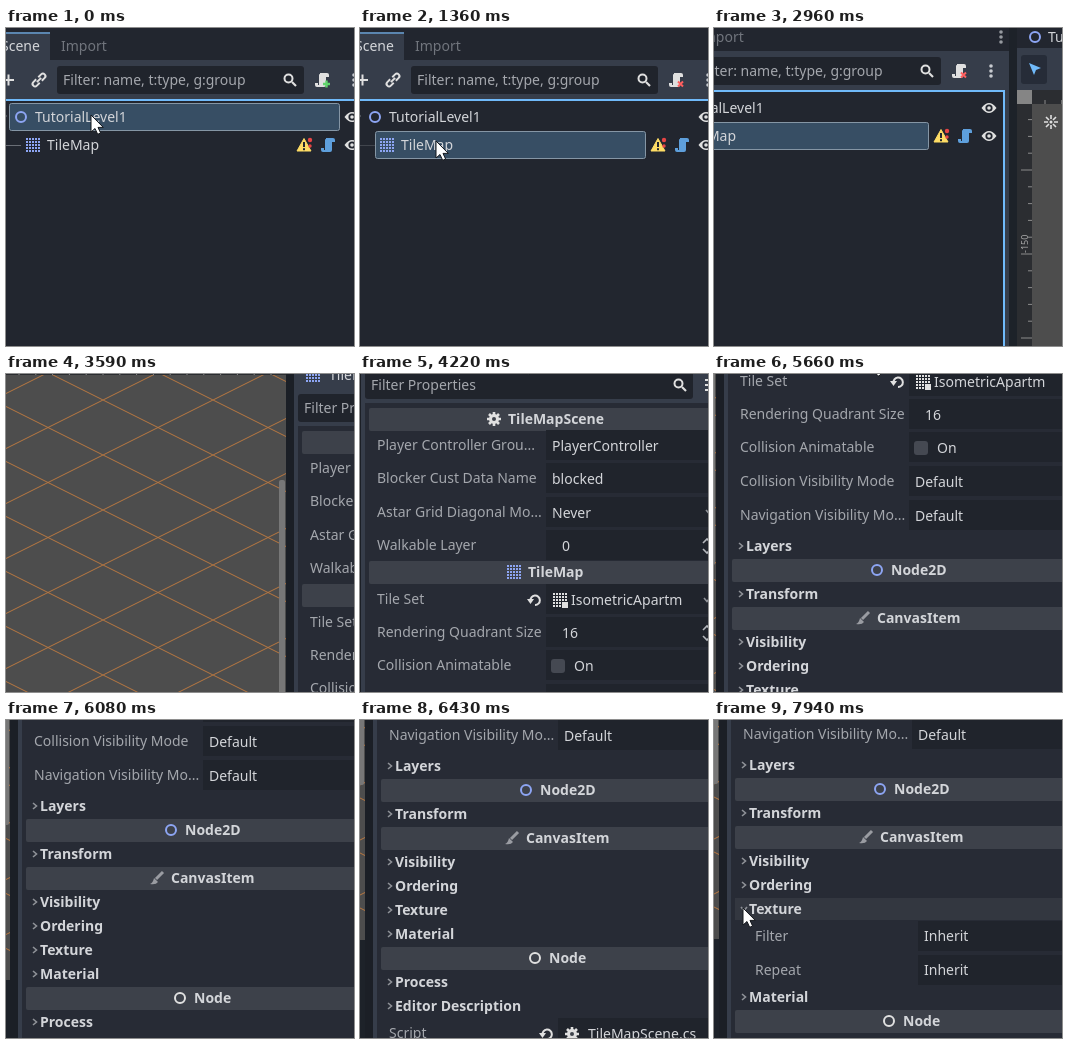
An HTML page that plays this animation: 348 px wide and 318 px high, repeating every 8 s.

```html
<!DOCTYPE html>
<html lang="en">
<head>
<meta charset="utf-8">
<title>Editor walkthrough</title>
<style>
html, body { margin: 0; width: 100%; height: 100%; overflow: hidden; background: #1d2229; }
svg { display: block; width: 100vw; height: 100vh; }
text { font: 14px "Noto Sans", sans-serif; fill: #d3d5d9; white-space: pre; }
.bold { font-weight: 700; }
.label { fill: #a4a7ad; }
.dim { fill: #71757d; }
</style>
</head>
<body>
<svg id="stage" viewBox="0 0 348 318" preserveAspectRatio="none"></svg>
<script>
const LOOP = 8000;
const INSPECTOR = { x: 1180, y: 107 };
const C = { base: '#363d4a', tree: '#22262f', panel: '#272b35', field: '#20242c',
            gap: '#1b1f26', bar: '#3d414a', light: '#e0e0e0', node2d: '#8da5f3', accent: '#70bafa' };

const rect = (x, y, w, h, fill, extra = '') =>
  `<rect x="${x}" y="${y}" width="${w}" height="${h}" fill="${fill}" ${extra}/>`;
// y is the middle of the capital letters
const text = (x, y, s, cls = '') => `<text x="${x}" y="${y + 5}" class="${cls}">${s}</text>`;
const line = (d, color, w = 1, extra = '') =>
  `<path d="${d}" fill="none" stroke="${color}" stroke-width="${w}" ${extra}/>`;
const shape = (d, fill, extra = '') => `<path d="${d}" fill="${fill}" ${extra}/>`;
const dot = (x, y, r, fill) => `<circle cx="${x}" cy="${y}" r="${r}" fill="${fill}"/>`;
const ring = (x, y, color) =>
  `<circle cx="${x}" cy="${y}" r="5" fill="none" stroke="${color}" stroke-width="2"/>`;
const at = (x, y, s, attrs = '') => `<g transform="translate(${x} ${y})" ${attrs}>${s}</g>`;

// Icons are centred on their origin
const search = line('M2 2L6 6', C.light, 2.2) +
  `<circle cx="-1.5" cy="-1.5" r="4" fill="none" stroke="${C.light}" stroke-width="2"/>`;
const eye = shape('M-7.5 0Q0-10 7.5 0Q0 10-7.5 0', C.light) + dot(0, 0, 3.6, '#22262f') + dot(0, 0, 1.8, C.light);
const scroll = color =>
  shape('M-2-7v1a1 1 0 0 0-1 1V5h-1V3h-3v2a2 2 0 0 0 2 2h7a2 2 0 0 0 2-2V-3h3v-2a2 2 0 0 0-2-2z', color);
const warning = shape('M0-6.5L7 6H-7Z', '#ffdd65', 'stroke="#ffdd65" stroke-linejoin="round"') +
  rect(-1, -3, 2, 5, '#22262f') + rect(-1, 3.2, 2, 2, '#22262f') +
  dot(6, -5, 2.2, '#e64545') + dot(6, 1, 1.7, '#e64545');
const dots = [-5, 0, 5].map(y => dot(0, y, 1.8, '#c8cbd0')).join('');
const reload = line('M-4.5 1A4.7 4.7 0 1 1 0 5', C.light, 2) + shape('M-8-1H-1L-4.5 4Z', C.light);
const gear = line('M0-7V7M-7 0H7M-5-5L5 5M-5 5L5-5', C.light, 2.6) + dot(0, 0, 5, C.light) + dot(0, 0, 2, C.bar);
const brush = line('M-1 1L6-6', '#9a9ca2', 3) + shape('M-3 0L1 4Q-1 7-7 6Q-4 5-3 0Z', '#9a9ca2');
const link = at(0, 0, line('M-1.5-2.5H-5.5a2.5 2.5 0 0 0 0 5H-1.5M1.5-2.5H5.5a2.5 2.5 0 0 1 0 5H1.5M-3 0H3', C.light, 2))
  .replace('translate(0 0)', 'rotate(-45)');
const chevron = line('M-2-3L1.5 0L-2 3', '#8f9298', 1.6);
const chevronDown = line('M-3-2L0 1.5L3-2', '#8f9298', 1.6);
const spinner = line('M-4-3L0-7L4-3M-4 3L0 7L4 3', '#b5b8bd', 1.6);
const arrow = 'M0 0V17L4 13.5L6.7 19.3L9.6 18L7 12.4H12.3Z';

function tiles(color, missing = () => false) {
  let s = '';
  for (let i = 0; i < 25; i++) {
    const x = i % 5, y = i / 5 | 0;
    if (!missing(x, y)) s += rect(x * 3 - 7, y * 3 - 7, 2, 2, color);
  }
  return s;
}
const tileMap = tiles(C.node2d);
const tileSet = tiles(C.light, (x, y) => x > 2 && y > 2) + rect(2, 2, 6, 6, C.light);

function sceneDock() {
  const selection = (id, x, y, w) =>
    rect(x, y, w, 27, '#374e64', `id="${id}" stroke="#8596a5" rx="2"`);
  return rect(-80, -60, 446, 700, C.base) +
    rect(-80, -60, 446, 92, C.tree) + rect(-80, 4, 124, 28, C.base) + rect(-80, 4, 124, 2, '#5b86b0') +
    text(-5, 18, 'Scene') + text(55, 18, 'Import', 'dim') + at(358, 18, dots, 'opacity=".7"') +
    line('M-3 52H8M2.5 46.5V57.5', C.light, 2) + at(33, 52, link) +
    rect(51, 38, 247, 28, C.field, 'rx="3"') + text(57, 52, 'Filter: name, t:type, g:group', 'label') +
    at(284, 52, search) + at(316, 52, scroll(C.light)) +
    line('M317 56H324M320.5 52.5V59.5', '#5fd46b', 2.4, 'id="attach"') +
    line('M318 53.5L323 58.5M323 53.5L318 58.5', '#ff5f5f', 2, 'id="detach"') + at(348, 52, dots) +
    rect(-20, 72, 381, 560, C.tree, `stroke="${C.accent}" stroke-width="2"`) +
    selection('rootRow', 3.5, 75.5, 330) + selection('mapRow', 15.5, 103.5, 270) +
    line('M-4 117.5H15', '#6a6e76', 1, 'id="branch"') + dot(-1, 88, 1.5, '#8f9298') +
    ring(15, 89, C.node2d) + text(29, 89, 'TutorialLevel1') + at(346, 89, eye) +
    at(27, 117, tileMap) + text(41, 117, 'TileMap') +
    at(298, 117, warning) + at(322, 117, scroll('#5e9fdc')) + at(346, 117, eye);
}

function viewport() {
  const left = 374, width = INSPECTOR.x - 7 - left;
  let ticks = '';
  for (let i = -4; i < 45; i++) {
    const y = 151 + i * 16.8;
    if (y > 86) ticks += `M${left + (i % 5 ? 11 : 4)} ${y}h${i % 5 ? 4 : 11}`;
  }
  for (let x = 402, i = 1; x < left + width; x += 16.8, i++) ticks += `M${x} 85v${i % 5 ? -4 : -11}`;
  return rect(left, -60, width, 89, C.tree) + ring(392, 18, C.node2d) + text(405, 18, 'TutorialLevel1') +
    rect(left, 29, width, 42, C.base) + rect(378, 36, 26, 29, '#262c38', 'rx="3"') +
    shape('M386 44L398 49L393 51L391 56Z', C.accent) + line('M439.5 38V64', '#4d5562') +
    rect(left, 71, width, 600, '#4d4d4d') +
    rect(480, 85, INSPECTOR.x - 487, 580, 'url(#iso)') +
    rect(left, 71, width, 14, '#2b2d31') + rect(left, 71, 15, 600, '#2b2d31') + rect(left, 71, 15, 14, '#858585') +
    line(ticks, '#8b8b8b') +
    `<text transform="translate(385 234) rotate(-90)" style="font-size:9px;fill:#aaa">-150</text>` +
    at(408, 103, line('M-7 0H-3M3 0H7M0-7V-3M0 3V7M-5-5L-2-2M5-5L2-2M-5 5L-2 2M5 5L2 2', C.light, 1.6) + dot(0, 0, 1.5, C.light)) +
    rect(INSPECTOR.x - 14, 190, 6, 326, '#777', 'rx="2"');
}

function inspector() {
  const header = (y, iconX, icon, textX, title) =>
    rect(9, y - 11, 400, 23, C.bar, 'rx="2"') + at(iconX, y, icon) + text(textX, y, title, 'bold');
  const field = (y, x = 186) => rect(x, y - 15, 220, 30, C.field);
  const property = (y, label, value, x = 192) =>
    text(17, y, label, 'label') + field(y) + text(x, y + 1, value);
  const number = (y, label, value) => property(y, label, value, 202) + at(347, y + 1, spinner);
  const choice = (y, label, value) => property(y, label, value) + at(349, y, chevronDown);
  const section = (y, title) => at(18, y, chevron) + text(23, y, title, 'bold');
  const nested = (y, label) => text(29, y, label, 'label') + field(y, 192) + text(198, y, 'Inherit');

  return rect(-7, -170, 8, 1000, C.gap) + rect(1, -170, 400, 1000, C.base) +
    rect(1, -170, 400, 95, C.tree) + rect(1, -103, 82, 28, C.base) +
    text(12, -89, 'Inspector') + text(95, -89, 'Node', 'dim') + text(148, -89, 'History', 'dim') +
    at(20, -22, tileMap) + text(36, -22, 'TileMap') +
    rect(5, -3, 328, 28, C.field, 'rx="3"') + text(11, 11, 'Filter Properties', 'label') + at(320, 11, search) +
    line('M345 6H352M345 11H352M345 16H352', C.light, 2) +
    rect(5, 29, 400, 800, C.panel) +
    header(45, 134, gear, 148, 'TileMapScene') +
    property(71, 'Player Controller Grou...', 'PlayerController') +
    property(104, 'Blocker Cust Data Name', 'blocked') +
    choice(138, 'Astar Grid Diagonal Mo...', 'Never') +
    number(171, 'Walkable Layer', '0') +
    header(198, 154, tileMap, 168, 'TileMap') +
    property(225, 'Tile Set', 'IsometricApartm', 211) + at(175, 226, reload) + at(200, 226, tileSet) + at(347, 226, chevronDown) +
    number(258, 'Rendering Quadrant Size', '16') +
    property(291, 'Collision Animatable', 'On', 214) + rect(191, 285, 14, 14, '#454952', 'rx="3"') +
    choice(325, 'Collision Visibility Mode', 'Default') +
    choice(359, 'Navigation Visibility Mo...', 'Default') +
    section(390, 'Layers') +
    header(414, 154, ring(0, 0, C.node2d), 168, 'Node2D') +
    section(438, 'Transform') +
    header(462, 140, brush, 154, 'CanvasItem') +
    section(486, 'Visibility') + section(510, 'Ordering') +
    rect(9, 523, 400, 22, '#333740', 'id="pressed"') +
    `<g id="folded">${at(18, 534, chevron)}</g><g id="unfolded">${at(18, 534, chevronDown)}
      ${nested(561, 'Filter')}${nested(595, 'Repeat')}</g>` +
    text(23, 534, 'Texture', 'bold') +
    `<g id="rest">${section(558, 'Material')}${header(582, 163, ring(0, 0, C.light), 177, 'Node')}
      ${section(606, 'Process')}${section(630, 'Editor Description')}
      ${property(657, 'Script', 'TileMapScene.cs', 216)}${at(175, 658, reload)}${at(200, 658, gear)}</g>`;
}

const stage = document.getElementById('stage');
stage.innerHTML = `<defs><pattern id="iso" width="110" height="55" patternUnits="userSpaceOnUse">
    ${line('M0 0L110 55M0 55L110 0', '#b8763f')}</pattern></defs>
  <g id="world">${viewport()}${sceneDock()}${at(INSPECTOR.x, INSPECTOR.y, inspector())}</g>
  <g id="cursor">${shape(arrow, '#fff', 'stroke="#15181d" stroke-width="1"')}</g>`;
const el = Object.fromEntries([...stage.querySelectorAll('[id]')].map(e => [e.id, e]));

// Keys: [time, x, y]
const cameraKeys = [
  [2800, 0, 0], [2960, 70, 9], [3400, 640, 62], [3800, 1100, 101], [4040, 1180, 107],
  [4190, 1180, 107], [5000, 1177, 209], [5660, 1171, 325], [6430, 1168, 451], [6670, 1168, 452]];
const cursorKeys = [
  [20, 85, 87], [150, 92, 86], [330, 92, 86], [480, 84, 82], [680, 45, 112], [800, 23, 128],
  [900, 40, 131], [1050, 76, 113], [2150, 76, 113], [2350, 122, 62], [2600, 178, -24],
  [4040, 178, -24], [4300, 157, -17], [5700, 157, -17], [6400, 157, -24], [6670, 120, 54],
  [6950, 85, 110], [7250, 20, 180], [7450, 29, 188]];

// Monotone cubic interpolation of one column
function track(keys, t, col) {
  const last = keys.length - 1;
  if (t <= keys[0][0]) return keys[0][col];
  if (t >= keys[last][0]) return keys[last][col];
  const i = keys.findIndex(k => k[0] > t) - 1;
  const slope = j => (keys[j + 1][col] - keys[j][col]) / (keys[j + 1][0] - keys[j][0]);
  const tangent = j => {
    if (j === 0 || j === last) return 0;
    const a = slope(j - 1), b = slope(j);
    return a * b > 0 ? 2 * a * b / (a + b) : 0;
  };
  const h = keys[i + 1][0] - keys[i][0], u = (t - keys[i][0]) / h, v = 1 - u;
  return keys[i][col] * (1 + 2 * u) * v * v + keys[i + 1][col] * u * u * (3 - 2 * u) +
    h * u * v * (tangent(i) * v - tangent(i + 1) * u);
}

const show = (e, on) => e.setAttribute('visibility', on ? 'visible' : 'hidden');
const move = (e, x, y) => e.setAttribute('transform', `translate(${x} ${y})`);

function render(t) {
  const mapSelected = t >= 1360, open = t >= 7940;
  move(el.world, -Math.round(track(cameraKeys, t, 1)), -Math.round(track(cameraKeys, t, 2)));
  move(el.cursor, Math.round(track(cursorKeys, t, 1)), Math.round(track(cursorKeys, t, 2)));
  show(el.rootRow, !mapSelected);
  show(el.attach, !mapSelected);
  show(el.mapRow, mapSelected);
  show(el.detach, mapSelected);
  el.branch.setAttribute('stroke', mapSelected ? '#41454d' : '#6a6e76');
  show(el.pressed, t >= 7880);
  show(el.folded, !open);
  show(el.unfolded, open);
  move(el.rest, 0, open ? 64 : 0);
}

const start = performance.now();
function frame() {
  render((performance.now() - start) % LOOP);
  requestAnimationFrame(frame);
}
render(0);
requestAnimationFrame(frame);
</script>
</body>
</html>
```
